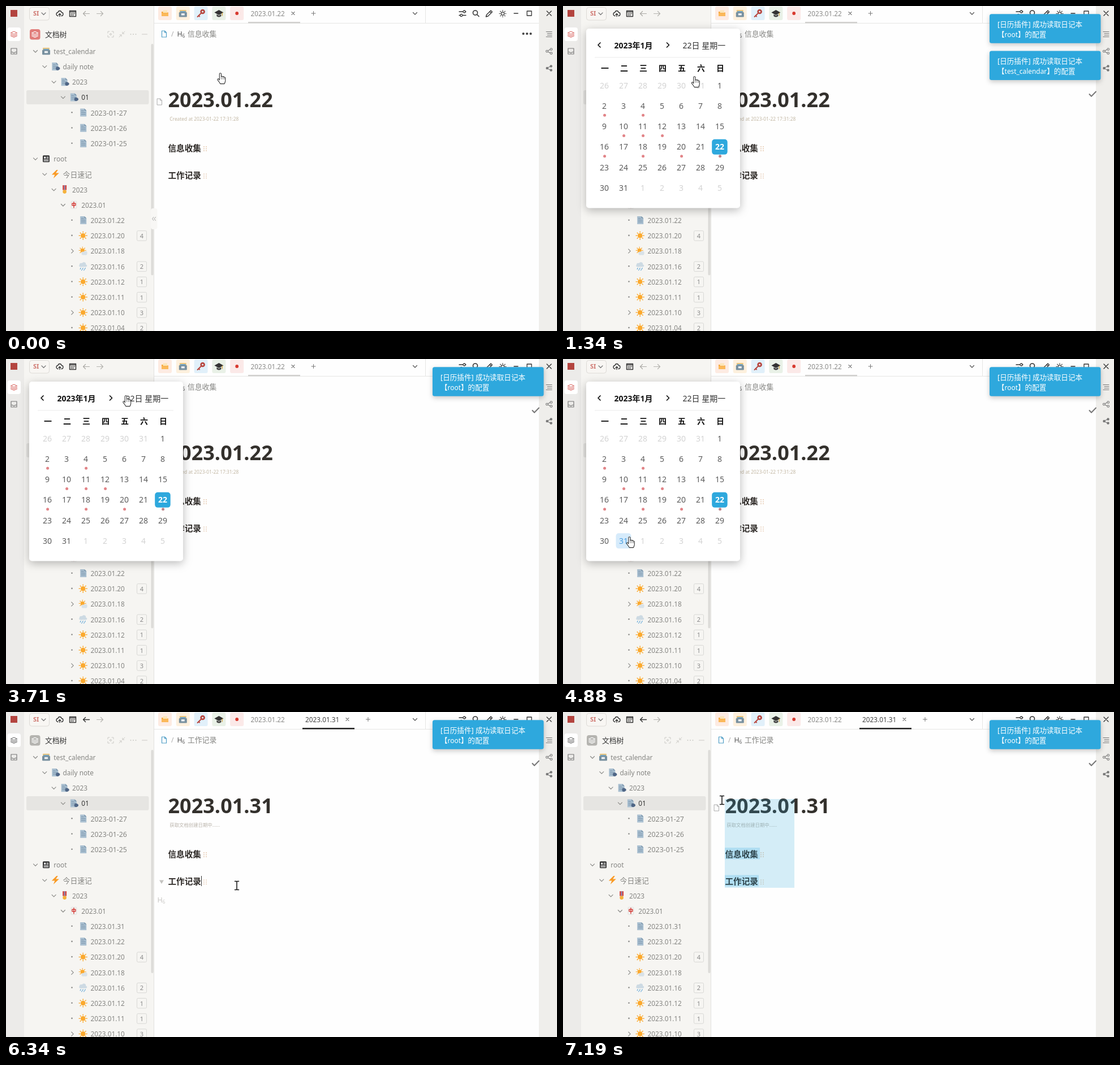
Animation of 974 by 575 pixels, one loop 7.26 s. Source, as an HTML page:

```html
<!DOCTYPE html>
<html lang="zh">
<head>
<meta charset="utf-8">
<title>Calendar notes</title>
<style>
html, body { margin: 0; width: 100%; height: 100%; overflow: hidden; background: #fefefe; }
svg { display: block; width: 974px; height: 575px; }
text { font-family: "Noto Sans", "Noto Sans CJK SC", "Noto Sans CJK", sans-serif; white-space: pre; }
.line { fill: none; stroke: #555; stroke-width: 1.2; stroke-linecap: round; stroke-linejoin: round; }
.panel { filter: drop-shadow(0 4px 8px rgba(0,0,0,.27)); }
.toast { filter: drop-shadow(0 3px 4px rgba(0,0,0,.22)); }
</style>
</head>
<body>
<svg id="stage" viewBox="0 0 974 575" xmlns="http://www.w3.org/2000/svg"></svg>
<script>
const LOOP = 7260;
const BLUE = '#2ea8dd';

// Markup helpers; text is placed by its vertical middle.
const isHan = s => /[\u4e00-\u9fff]/.test(s);
const text = (x, y, s, size, fill, extra = '') =>
  `<text x="${x}" y="${y + size * (isHan(s) ? .38 : .36)}" font-size="${size}" fill="${fill}" ${extra}>${s}</text>`;
const rect = (x, y, w, h, fill, r = 0, extra = '') =>
  `<rect x="${x}" y="${y}" width="${w}" height="${h}" rx="${r}" fill="${fill}" ${extra}/>`;
const disc = (x, y, r, fill) => `<circle cx="${x}" cy="${y}" r="${r}" fill="${fill}"/>`;
const shape = (d, fill) => `<path d="${d}" fill="${fill}"/>`;
const line = (x, y, d, color = '#555', width = 1.2) =>
  `<path class="line" transform="translate(${x} ${y})" d="${d}" style="stroke:${color};stroke-width:${width}"/>`;
const put = (id, x, y) => `<use href="#${id}" transform="translate(${x} ${y})"/>`;
const on = (spans, ...parts) => `<g data-on="${spans}">${parts.join('')}</g>`;
const bold = 'font-weight="700"';
const middle = 'text-anchor="middle"';

const DOWN = 'M-3.5-1.5 0 2 3.5-1.5', RIGHT = 'M-1.5-3.5 2 0-1.5 3.5';
const CROSS = 'M-2.5-2.5 2.5 2.5M2.5-2.5-2.5 2.5', PLUS = 'M-3.5 0H3.5M0-3.5V3.5';
const LAYERS = 'M0-5 5.5-2.5 0 0-5.5-2.5ZM-5.5 0 0 2.7 5.5 0M-5.5 2.6 0 5.3 5.5 2.6';
const FILE = 'M-4-5.5H1L4-2.5V5.5H-4ZM1-5.5V-2.5H4';
const BACK = 'M5.5 0H-5.5M-1.5-4-5.5 0-1.5 4', FORWARD = 'M-5.5 0H5.5M1.5-4 5.5 0 1.5 4';
const SHARE = 'M-2-1 2-3M-2 1 2 3';

const rays = Array.from({length: 8}, (_, i) => {
  const a = i * Math.PI / 4, c = Math.cos(a), s = Math.sin(a);
  return `M${c * 5.6} ${s * 5.6}L${c * 7} ${s * 7}`;
}).join('');

const page = shape('M-5-7H2.5L6-3.5V7H-5Z', '#a9bfd0') + shape('M2.5-7V-3.5H6Z', '#7892a8') +
  line(0, 0, 'M-3-3H1M-3 0H4M-3 3H4', '#7993aa', 1);
const sun = disc(0, 0, 4.3, '#fba92e') + line(0, 0, rays, '#fba92e', 1.5);

const symbols = {
  page, sun,
  note: `<g transform="translate(-1 0)">${page}</g>` + disc(4, 3.5, 3.2, '#4f6686') + rect(3, 1.8, 5, 3.5, '#4f6686', 1),
  box: rect(-6, -6, 12, 5, '#f0c77c', 1) + rect(-5, -4, 10, 3, '#6fa3c4') +
    rect(-7, -2, 14, 8.5, '#78909f', 1.2) + rect(-3, 0, 6, 3.5, '#eceff1', .5),
  folder: shape('M-6-3H-2L0-1.5H6V5H-6Z', '#f6a73b') + shape('M-3.5-5.5H4V-1H-3.5Z', '#fce5b8') + shape('M-6-.5H6V5H-6Z', '#fbb85a'),
  key: `<circle cx="3" cy="-3" r="2.9" fill="none" stroke="#b84740" stroke-width="2.8"/>` + line(0, 0, 'M1-1-6 6M-4 4-2.5 5.5', '#b84740', 2),
  cap: shape('M0-6 8-1.5 0 3-8-1.5Z', '#333') + shape('M-4 1.5 0 4 4 1.5V5Q0 8-4 5Z', '#444') + line(0, 0, 'M6-1V4', '#d5a23d', 1.2),
  news: rect(-6, -6, 12, 12, '#333', 1.5) + rect(-3.8, -3.5, 3, 3, '#fff') +
    line(0, 0, 'M1-3H4M1-1H4M-4 1.5H4M-4 3.7H4', '#fff', 1.1),
  bolt: shape('M2-7.5-6.5 1H-1L-3.5 7.5 6.5-2H.8L4.5-7.5Z', '#f99b27'),
  medal: rect(-3.5, -7.5, 7, 8.5, '#d94b43') + rect(-1, -7.5, 2, 8.5, '#7f8fc0') + disc(0, 4, 3.3, '#f5b23c'),
  tile: rect(-5, -6.5, 10, 13, '#f2f2f0', 1.5, 'stroke="#d5d5d2" stroke-width=".6"') +
    line(0, 0, 'M-3-2.5H3V1H-3ZM0-5V5', '#d43c38', 1.4),
  cloudsun: `<g transform="translate(-1 -1) scale(.85)">${sun}</g>` +
    disc(0, 4, 2.8, '#d9e2e8') + disc(4, 3.5, 3.5, '#d9e2e8') + rect(-2, 4, 9, 3, '#d9e2e8', 1.5),
  rain: disc(-3, -2.5, 3.3, '#cddae3') + disc(1.5, -3.8, 3.5, '#cddae3') + rect(-7, -3, 14, 4, '#cddae3', 2) +
    line(0, 0, 'M-4 3-5 5M0 3-1 5M4 3 3 5M-2 6-2.5 7M2 6 1.5 7', '#62a8d8', 1.2),
  grip: [-3.5, 0, 3.5].map(y => disc(-2, y, .9, '#e3c3a6') + disc(2, y, .9, '#e3c3a6')).join(''),
  hand: '<path d="M-3.2 3V-7.7a1.6 1.6 0 0 1 3.2 0V-2.6q.2-1.2 1.5-1.1t1.4 1.3q.3-1 1.4-.7t1.2 1.4q1.9-.5 1.8 1.5V4Q7.2 6.3 5.6 9.6H-1.8Q-3.3 6.5-5.9 3.6-7.3 1.7-6 .9T-3.2 3Z" fill="#fff" stroke="#333" stroke-width="1.1" stroke-linejoin="round"/><path class="line" d="M0-2.5V1.5M2.9-2V1.5M5.5-1V1.5" style="stroke-width:.8"/>',
  beam: line(0, 0, 'M-3.5-7.5H-.8L0-6.7.8-7.5H3.5M0-6.7V6.7M-3.5 7.5H-.8L0 6.7.8 7.5H3.5', '#111', 1.5),
};

const ROW = 27.2, rowY = i => 80.5 + i * ROW;
const labelSize = s => isHan(s) ? 12.8 : s.includes('-') ? 12.35 : 11.8;
function treeRow(i, depth, icon, label, mark, count) {
  const dx = depth * 16.3, y = rowY(i);
  const lead = mark === '.' ? disc(116.5, y - 1, 1.3, '#8a8a88') : line(52 + dx, y - .5, mark === '>' ? RIGHT : DOWN, '#8b8b88', 1.2);
  const badge = count ? rect(231.5, y - 9.2, 17, 17.5, 'none', 2, 'stroke="#d8d8d5"') + text(240, y, count, 11, '#888', middle) : '';
  return lead + put(icon, 71 + dx, y - .7) + text(84.3 + dx, y, label, labelSize(label), i === 3 ? '#333' : '#858582') + badge;
}

const folders = [
  [0, 'box', 'test_calendar'], [1, 'note', 'daily note'], [2, 'note', '2023'], [3, 'note', '01'],
  [4, 'page', '2023-01-27', '.'], [4, 'page', '2023-01-26', '.'], [4, 'page', '2023-01-25', '.'],
  [0, 'news', 'root'], [1, 'bolt', '今日速记'], [2, 'medal', '2023'], [3, 'tile', '2023.01'],
];
const notes = [
  ['page', '22', '.'], ['sun', '20', '.', 4], ['cloudsun', '18', '>'], ['rain', '16', '.', 2], ['sun', '12', '.', 1],
  ['sun', '11', '.', 1], ['sun', '10', '>', 3], ['sun', '04', '.', 2],
];

const sidebar = () => [
  rect(0, 0, 32, 575, '#ecebe9'), rect(32, 0, 229.5, 575, '#f6f5f2'), rect(261, 0, 1, 575, '#e2e1de'),
  rect(8, 7, 12, 12, '#b3443f'),
  rect(2.5, 38, 23.5, 24, '#fff', 4),
  on('0-5420', line(14, 50, LAYERS, '#dc7470'), rect(42, 41, 18.5, 18.5, '#e17d7a', 4)),
  on('5420-7260', line(14, 50, LAYERS, '#777'), rect(42, 41, 18.5, 18.5, '#b5b4b0', 4)),
  line(51.2, 50.2, LAYERS, '#fff', 1.1),
  line(14, 80, 'M-5-5H5V5H-5ZM-5 1.5H-2L-1 3H1L2 1.5H5', '#777'),
  rect(41.5, 2.5, 35, 22.5, '#f8f6f3', 4, 'stroke="#dcdad6"'), text(48, 13.5, 'SI', 11, '#cf7770', bold), line(66.5, 13.5, DOWN, '#777'),
  line(95, 13.5, 'M-3 4H-3.5Q-6 3.5-6 .8T-3.3-2Q-2.5-5 0-5T3.3-2Q6-2 6 .8T3.5 4H3M0 5V0M-2 2 0 0 2 2', '#333', 1.3),
  line(118, 13.5, 'M-5.5-5H5.5V5H-5.5ZM-5.5-3H5.5M-3 0H-2M0 0H1M3 0H3.5M-3 2.5H-2M0 2.5H1', '#333', 1.4),
  on('0-5420', line(142, 13.5, BACK, '#aaa9a5')), on('5420-7260', line(142, 13.5, BACK, '#333', 1.4)), line(166, 13.5, FORWARD, '#b5b4b0'),
  text(69, 50.5, '文档树', 12.8, '#333'),
  line(185, 50, 'M-5-2V-5H-2M2-5H5V-2M5 2V5H2M-2 5H-5V2M-1.5 0A1.5 1.5 0 1 0 1.5 0 1.5 1.5 0 1 0-1.5 0', '#cbcac6', 1),
  line(205, 50, 'M5-5 1-1H4M1-1V-4M-5 5-1 1H-4M-1 1V4', '#cbcac6', 1),
  [220.5, 225, 229.5].map(x => disc(x, 50, 1, '#cbcac6')).join(''), line(245, 50, 'M-4.5 0H4.5', '#cbcac6', 1.1),
  rect(36, 149, 216.5, 25, '#e6e5e2', 3),
  folders.map(([d, icon, label, mark], i) => treeRow(i, d, icon, label, mark)).join(''),
  on('5550-7260', treeRow(11, 4, 'page', '2023.01.31', '.')),
  '<g id="notes">', notes.map(([icon, day, mark, n], i) => treeRow(11 + i, 4, icon, '2023.01.' + day, mark, n)).join(''), '</g>',
  on('0-5550', rect(256.5, 67, 4, 409.5, '#dcdbd8', 2)), on('5550-7260', rect(256.5, 67, 4, 395, '#dcdbd8', 2)),
  on('0-130', rect(256, 358, 11.5, 37, '#f8f7f5', 4), line(261.5, 376.5, 'M-.5-3-3 0-.5 3M3-3 .5 0 3 3', '#999', .9)),
];

const pinned = [['folder', '#fdebe2'], ['box', '#fdf0dd'], ['key', '#e1f0fa'], ['cap', '#e9f1e7'], [null, '#fbe9e8']];
const windowBar = () => [
  rect(942, 0, 32, 575, '#efeeeb'), rect(262, 30, 680, 1, '#e6e6e4'), rect(741, 0, 1, 30, '#e6e6e4'),
  pinned.map(([icon, fill], i) => {
    const x = 281 + i * 31.8;
    return rect(x - 12, 1, 24, 24, fill, 3) + (icon ? put(icon, x, 13) : disc(x, 13, 2.9, '#d8392f'));
  }).join(''),
  text(432.5, 13.5, '2023.01.22', 11.8, '#8a8a88'),
  on('0-5420', rect(428, 28, 92, 2.5, '#d2d1cf'), line(507.5, 13, CROSS, '#777', 1.1), line(543.5, 13, PLUS, '#777', 1)),
  on('5420-7260', rect(524, 28, 92, 2.5, '#222'), text(529, 13.5, '2023.01.31', 11.8, '#444'),
    line(603.5, 13, CROSS, '#777', 1.1), line(640, 13, PLUS, '#777', 1)),
  line(723, 13, DOWN, '#555'),
  line(807, 13.5, 'M-6-3.5H1M5-3.5H6M1-3.5A2 2 0 1 0 5-3.5 2 2 0 1 0 1-3.5M-6 3H-4M0 3H6M-4 3A2 2 0 1 0 0 3 2 2 0 1 0-4 3', '#333', 1.3),
  line(830, 13, 'M-4.5-1A4 4 0 1 0 3.5-1 4 4 0 1 0-4.5-1M2.5 2 6 5.5', '#333', 1.6),
  line(854, 13.5, 'M-5.5 5.5-4.5 2 3-5.5 5.5-3-2 4.5ZM1-3.5 3.5-1', '#333', 1.4),
  line(878, 13.5, 'M-2.8 0A2.8 2.8 0 1 0 2.8 0 2.8 2.8 0 1 0-2.8 0', '#333', 1.3),
  `<g transform="translate(878 13.5) scale(.85)">${line(0, 0, rays, '#333', 1.4)}</g>`,
  line(901.5, 13, 'M-3.5 0H3.5', '#333', 1.4), line(925, 13, 'M-4-4H4V4H-4Z', '#333', 1.3), line(960, 13, 'M-4-4 4 4M4-4-4 4', '#333', 1.3),
  line(960, 50, 'M-5-4.5H5M-3-1.5H5M-3 1.5H5M-5 4.5H5', '#777', 1.1),
  line(960, 80, SHARE + 'M-5.5 0A1.8 1.8 0 1 0-1.9 0 1.8 1.8 0 1 0-5.5 0M1.9-3.5A1.8 1.8 0 1 0 5.5-3.5 1.8 1.8 0 1 0 1.9-3.5M1.9 3.5A1.8 1.8 0 1 0 5.5 3.5 1.8 1.8 0 1 0 1.9 3.5', '#777', 1.1),
  line(960, 110, SHARE, '#777'), disc(956.5, 110, 2.2, '#777'), disc(963.5, 106.5, 2.2, '#777'), disc(963.5, 113.5, 2.2, '#777'),
  [914.5, 921, 927.5].map(x => disc(x, 49, 2.1, '#444')).join(''),
];

const editor = () => [
  line(279.5, 49.5, FILE, '#4f9dc6', 1.2), text(292, 49.5, '/', 12, '#aaa'),
  text(302.5, 49.5, 'H<tspan font-size="8" dy="1.5">6</tspan>', 12.5, '#555', 'font-weight="500"'),
  on('0-6210', text(321, 49.5, '信息收集', 12.8, '#858582')), on('6210-7260', text(321, 49.5, '工作记录', 12.8, '#858582')),
  on('0-130,6990-7260', line(271.5, 169.5, FILE, '#aaa', 1)),
  on('0-5420', text(286.5, 166, '2023.01.22', 36, '#33302c', bold), text(289.3, 200, 'Created at 2023-01-22 17:31:28', 8.4, '#c3b8a4')),
  on('5420-7260', text(286.5, 166, '2023.01.31', 36, '#33302c', bold), text(289.3, 200, '获取文档创建日期中......', 8.4, '#b9b3aa')),
  on('6860-7260', rect(286, 240, 62, 20.5, BLUE, 0, 'opacity=".22"')),
  on('6730-7260', rect(286, 288.5, 60, 20, BLUE, 0, 'opacity=".22"')),
  ['信息收集', '工作记录'].map((s, i) => text(286.5, 251 + i * 48.3, s, 14.6, '#2e2a27', bold) + put('grip', 352, 252.5 + i * 48.3)).join(''),
  on('6210-6600', shape('M271 297.5H279L275 304Z', '#c4c3c0'), text(267.5, 332.5, 'H<tspan font-size="8" dy="1.5">6</tspan>', 12.5, '#c8c7c4')),
  on('6340-6600', rect(345, 290, 1, 18, '#333')),
  `<rect id="marquee" fill="${BLUE}" opacity=".2"/>`,
];

const colX = c => 73 + c * 34, cellY = r => 140.6 + r * 36.25;
function monthGrid(lead, before) {
  return Array.from({length: 42}, (_, i) => {
    const n = i - lead + 1, inside = n > 0 && n < 32;
    const day = n < 1 ? n + before : n > 31 ? n - 31 : n;
    const today = lead === 6 && n === 22;
    const x = colX(i % 7), y = cellY(i / 7 | 0);
    return (today ? rect(x - 13.8, y - 13.5, 27.5, 27, BLUE, 5) : '') +
      text(x, y, day, 14, today ? '#fff' : inside ? '#5c5c5c' : '#d3d3d3', `${middle} ${today ? bold : 'class="day"'}`);
  }).join('');
}
const dot = n => { const i = n + 5; return disc(colX(i % 7) + .6, cellY(i / 7 | 0) + 16.5, 2.5, n === 22 ? '#bf8589' : '#e28488'); };

const calendar = () => [
  on('410-5950',
    `<g class="panel">${rect(41, 40, 272, 317.5, '#fff', 5)}</g>`,
    line(64, 69, 'M2-4-2 0 2 4', '#111', 1.7), line(185.5, 69, 'M-2-4 2 0-2 4', '#111', 1.7),
    text(211.5, 69.5, '22日 星期一', 14, '#333'), rect(56, 90.5, 240, 1, '#ebebeb'),
    [...'一二三四五六日'].map((s, i) => text(74 + i * 34, 110, s, 14, '#111', `${bold} ${middle}`)).join(''),
    `<rect id="hover" width="27" height="27" rx="5" fill="#d6ebfb"/>`,
    on('0-1860,2520-7260', text(124.5, 69.5, '2023年1月', 14, '#111', `${bold} ${middle}`), `<g id="january">${monthGrid(6, 31)}</g>`),
    on('1860-2520', text(124.5, 69.5, '2022年12月', 14, '#111', `${bold} ${middle}`), monthGrid(3, 30)),
    on('1080-1860,2660-7260', [2, 4, 10, 11, 12, 16, 18, 20, 22].map(dot).join('')),
    on('5280-7260', dot(31)),
    on('670-1080', rect(134, 85, 177.5, 270, '#ececec', 4), rect(152, 122, 141, 28, '#c9c9c9'),
      text(151.5, 108.5, 'test_calendar', 14.5, '#222'), text(151.5, 136.5, 'root', 14.5, '#222'))),
];

const toast = (y, book) => `<g class="toast">${rect(754, y, 196.5, 51.5, BLUE, 3.5)}</g>` +
  text(768, y + 17.5, '[日历插件] 成功读取日记本', 12.6, '#fff') +
  text(768, y + 35.5, `【<tspan font-size="11.9">${book}</tspan>】的配置`, 12.6, '#fff');
const tick = y => line(936, y, 'M-5.5 0-2 3.8 6-4.5', '#777', 2);
const messages = () => [
  on('540-1080', toast(14.3, 'test_calendar')),
  on('1080-2120', toast(79.5, 'test_calendar')),
  on('1080-2520,2660-7260', toast(14.3, 'root')),
  on('540-1080,2120-7260', tick(91)), on('1080-2120', tick(156)),
];

const stage = document.getElementById('stage');
stage.innerHTML = '<defs>' + Object.entries(symbols).map(([id, s]) => `<g id="${id}">${s}</g>`).join('') + '</defs>' +
  [rect(0, 0, 974, 575, '#fefefe'), ...editor(), ...sidebar(), ...windowBar(), ...calendar(), ...messages()].join('') +
  '<use id="pointer"/>';

// Pointer stops: time, x, y. It moves in hard steps.
const stops = [
  [0, 380.5, 128], [130, 118, 17], [540, 190, 62], [670, 250, 90], [800, 234, 134], [1470, 190, 110], [1600, 110, 85],
  [1730, 69, 74], [2120, 120, 75], [2250, 180, 74], [2380, 213.5, 74], [3580, 212, 73], [3710, 213.5, 74],
  [3970, 228, 84], [4100, 243, 110], [4230, 238, 150], [4360, 220, 195], [4490, 190, 240], [4620, 158, 279],
  [4750, 128, 316], [4880, 119, 324], [5950, 190, 320], [6080, 300, 312], [6210, 380, 308], [6340, 408, 307],
  [6600, 400, 300], [6730, 375, 270], [6860, 300, 215], [6990, 197, 180], [7120, 260, 160], [7190, 281, 156],
];
const $ = id => document.getElementById(id);
const timed = [...document.querySelectorAll('[data-on]')].map(el => ({
  el, spans: el.dataset.on.split(',').map(s => s.split('-').map(Number)),
}));
const days = [...$('january').querySelectorAll('text')];
const setAll = (el, attrs) => Object.entries(attrs).forEach(([k, v]) => el.setAttribute(k, v));

function hoverDay(x, y) {
  const col = Math.round((x - 73) / 34), row = Math.round((y - 140.6) / 36.25);
  const hit = col >= 0 && col < 7 && row >= 0 && row < 6 && Math.abs(x - colX(col)) < 13.5 && Math.abs(y - cellY(row)) < 13.5;
  $('hover').style.display = hit ? '' : 'none';
  if (hit) setAll($('hover'), {x: colX(col) - 13.5, y: cellY(row) - 13.5});
  days.forEach((el, i) => { if (el.classList.contains('day')) el.style.fill = hit && i === row * 7 + col ? '#4a9fe0' : ''; });
}

function draw(t) {
  for (const {el, spans} of timed) el.style.display = spans.some(([a, b]) => t >= a && t < b) ? '' : 'none';
  const [, x, y] = stops.findLast(s => t >= s[0]);
  setAll($('pointer'), {href: t < 6210 ? '#hand' : '#beam', transform: `translate(${x} ${y})`});
  $('notes').setAttribute('transform', `translate(0 ${t < 5550 ? 0 : ROW})`);
  const overMenu = t >= 670 && t < 1080, otherMonth = t >= 1860 && t < 2520;
  hoverDay(overMenu || otherMonth ? -99 : x - 2, y - 9);
  const left = Math.max(286, x), top = y - 2;
  setAll($('marquee'), t < 6600 ? {width: 0, height: 0} : {x: left, y: top, width: 409 - left, height: 311 - top});
}

const start = performance.now();
function frame() {
  draw((performance.now() - start) % LOOP);
  requestAnimationFrame(frame);
}
frame();
</script>
</body>
</html>
```
